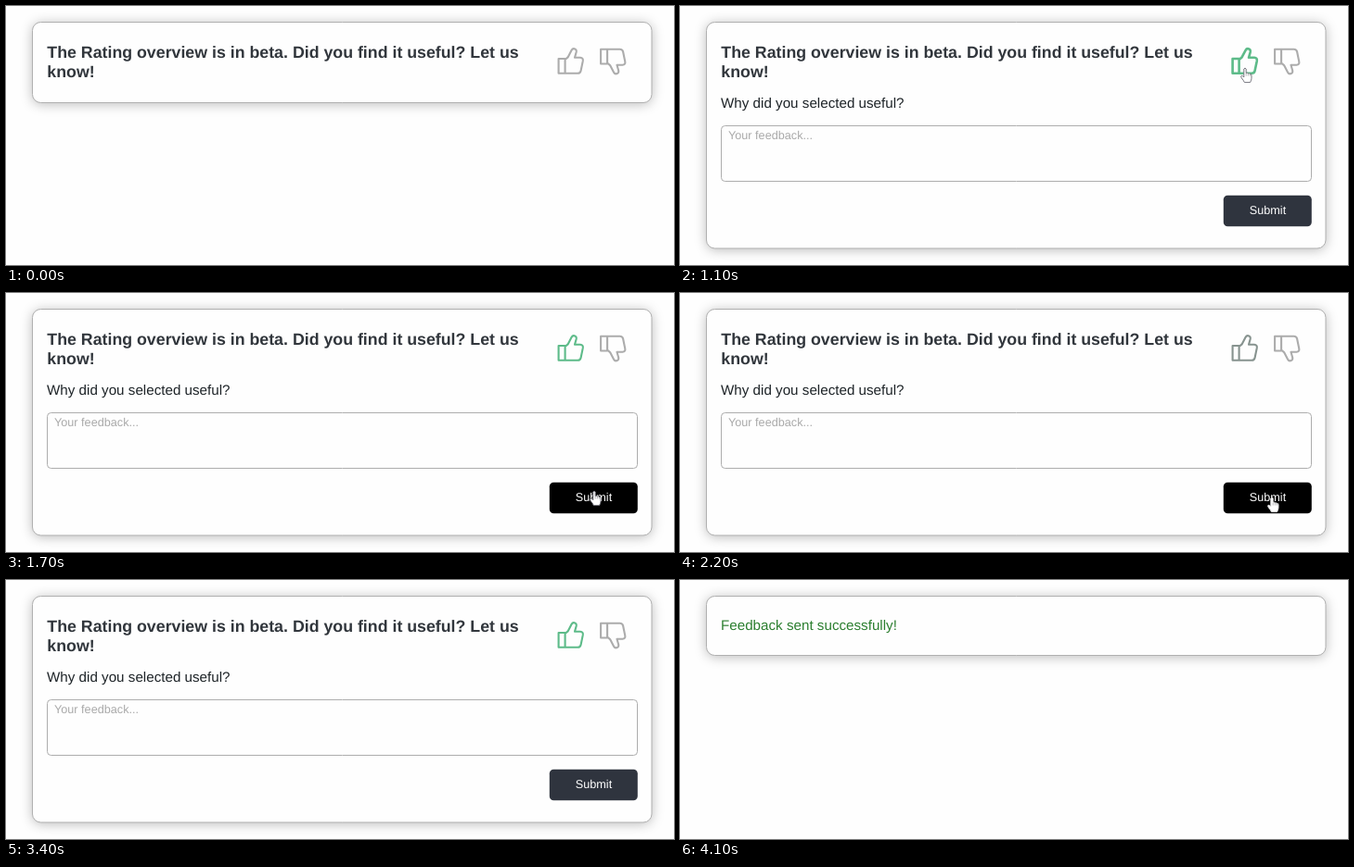
Recreate the animation shown at these times as an HTML page with a canvas. Size 720 px wide and 280 px high, loop 4800 ms.

```html
<!DOCTYPE html>
<html lang="en">
<head>
<meta charset="utf-8">
<title>Feedback card</title>
<style>
html, body { margin: 0; width: 100%; height: 100%; overflow: hidden; background: #fefefe; }
canvas { display: block; }
</style>
</head>
<body>
<canvas id="stage" width="720" height="280"></canvas>
<script>
const ctx = document.getElementById('stage').getContext('2d');
const LOOP = 4800, STEP = 100;
const FACE = '"Liberation Sans", Arial, sans-serif';
const GREY = '#acacac', GREEN = '#5dbb89';

const thumb = new Path2D('M1.6 12H8.6V27.8H1.6Z M8.6 13L11.6 10.4L15.6 2.8Q16.8 .6 19.2 1.4Q21.2 2.2 20.7 4.8L19 10.8H25Q28.4 11 27.8 14.4L25.6 25Q25 27.8 22.2 27.8H8.6');
const arrow = new Path2D('M0 0V12.2L2.8 9.7L4.7 13.8L6.6 13L4.8 8.9H8.4Z');
const hand = new Path2D('M-1.2 1Q0 -.9 1.2 1V5.6Q2.5 4.6 3.4 6Q4.8 5.2 5.4 6.6Q7 6 7 8V11.2Q7 13 5.6 15.6H-.6Q-1.6 13.2-3.6 11Q-5.2 8.7-3.8 8.3Q-2.6 8-1.2 10Z');

// Pointer stops: time, x, y of the tip
const stops = [[300, 592, 162], [500, 594, 140], [700, 598, 97], [800, 609, 67],
  [1500, 609, 67], [1700, 634, 214], [2000, 634, 214], [2200, 638, 221],
  [3000, 638, 221], [3100, 619, 236], [3200, 594, 258], [3300, 574, 290]];

function pointerAt(t) {
  for (let i = 1; i < stops.length; i++) {
    const [t0, x0, y0] = stops[i - 1], [t1, x1, y1] = stops[i];
    if (t >= t0 && t <= t1) {
      const k = (t - t0) / (t1 - t0);
      return { x: x0 + (x1 - x0) * k, y: y0 + (y1 - y0) * k };
    }
  }
  return null;
}

function text(str, x, y, size, color, weight = 'normal') {
  ctx.font = `${weight} ${size}px ${FACE}`;
  ctx.textRendering = 'geometricPrecision';
  ctx.fillStyle = color;
  ctx.fillText(str, x, y);
}

function box(x, y, w, h, r, fill, stroke) {
  ctx.beginPath();
  ctx.roundRect(x, y, w, h, r);
  ctx.fillStyle = fill;
  ctx.fill();
  if (stroke) {
    ctx.shadowColor = 'transparent';
    ctx.strokeStyle = stroke;
    ctx.lineWidth = 1;
    ctx.stroke();
  }
}

function card(bottom) {
  ctx.save();
  ctx.shadowColor = 'rgba(0,0,0,.28)';
  ctx.shadowBlur = 13;
  ctx.shadowOffsetY = 1.5;
  box(28.5, 17.5, 667.5, bottom - 17.5, 9, '#fefefe', '#b0b0b0');
  ctx.restore();
}

function icon(x, y, flip, color, width = 2.1) {
  ctx.save();
  ctx.translate(x, y);
  ctx.scale(1, flip);
  ctx.lineJoin = ctx.lineCap = 'round';
  ctx.lineWidth = width;
  ctx.strokeStyle = color;
  ctx.stroke(thumb);
  ctx.restore();
}

function pointer(p, shape, edge) {
  ctx.save();
  ctx.translate(p.x, p.y);
  ctx.fillStyle = '#fff';
  ctx.fill(shape);
  ctx.strokeStyle = edge;
  ctx.lineWidth = 1;
  ctx.lineJoin = 'round';
  ctx.stroke(shape);
  if (shape === hand) {
    ctx.beginPath();
    for (const x of [1.2, 3.3, 5.3]) {
      ctx.moveTo(x, 6);
      ctx.lineTo(x, 8.6);
    }
    ctx.lineWidth = .6;
    ctx.strokeStyle = '#8a8a8e';
    ctx.stroke();
  }
  ctx.restore();
}

function form(overButton) {
  text('Why did you selected useful?', 44, 110, 15.2, '#1e2428');
  box(44.5, 129.5, 636, 60, 4, '#fefefe', '#adadad');
  text('Your feedback...', 52, 144, 12.67, '#a9a9a9');
  box(585.8, 204.8, 95, 33.4, 4.5, overButton ? '#000' : '#2f343e');
  text('Submit', 613.8, 225, 12.67, '#fff');
}

function draw(t) {
  ctx.fillStyle = '#fefefe';
  ctx.fillRect(0, 0, 720, 280);

  if (t >= 3900) {
    card(81.5);
    text('Feedback sent successfully!', 44, 54, 15.2, '#2c7f30');
    return;
  }

  const open = t >= 900;
  const overThumb = t >= 800 && t < 1600;
  const overButton = t >= 1700 && t < 3200;
  const resting = t >= 2200 && t < 3100;

  card(open ? 262 : 104.5);
  text('The Rating overview is in beta. Did you find it useful? Let us', 44.3, 56, 17.78, '#31363c', 'bold');
  text('know!', 44.3, 77, 17.78, '#31363c', 'bold');
  icon(594, 45, 1, t < 800 ? GREY : resting ? '#87938f' : GREEN, overThumb ? 2.6 : 2.1);
  icon(639.5, 74.5, -1, GREY);
  if (open) form(overButton);

  const p = pointerAt(t);
  if (p) pointer(p, overThumb || overButton ? hand : arrow, resting ? '#ddd' : '#77777f');
}

const start = performance.now();
function tick() {
  const t = (performance.now() - start) % LOOP;
  draw(Math.floor(t / STEP) * STEP);
  requestAnimationFrame(tick);
}
tick();
</script>
</body>
</html>
```
